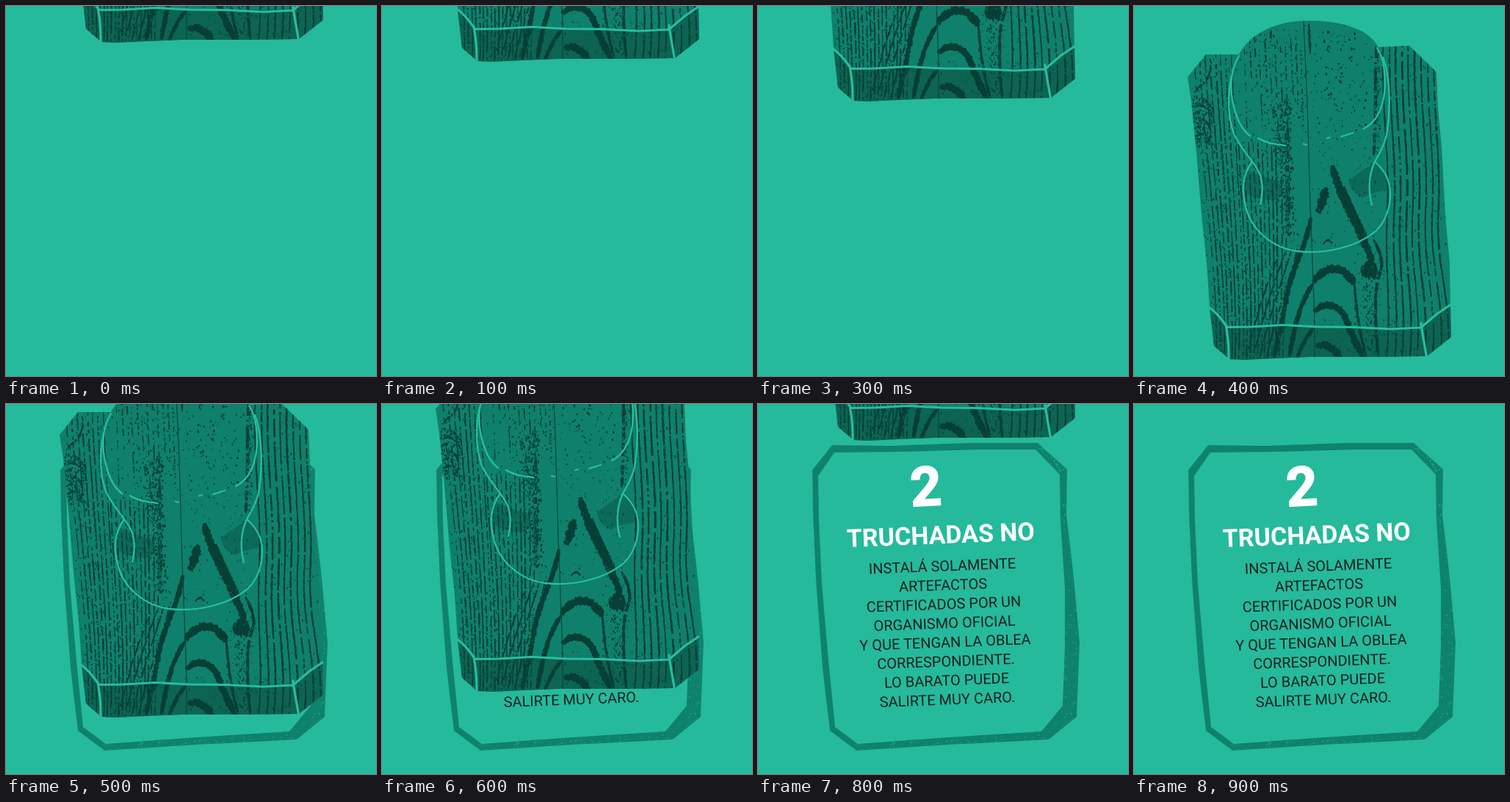
Write an HTML page that moves like this. It is 504 by 504 pixels and loops after 7900 ms.

```html
<!DOCTYPE html>
<html lang="es">
<head>
<meta charset="utf-8">
<title>Truchadas no</title>
<style>
  html, body { margin: 0; width: 100%; height: 100%; overflow: hidden; background: #25ba9b; }
  svg { display: block; width: 100%; height: 100%; }
  text { font-family: Roboto, sans-serif; text-anchor: middle; }
  .title { font-size: 34px; font-weight: 700; fill: #fff; }
  .digit { font-size: 75px; font-weight: 700; fill: #fff; stroke: #fff; stroke-width: 1.5; }
  .body { font-size: 20px; fill: #14211f; }
  .line { fill: none; stroke: #28bd9f; stroke-width: 2.3; stroke-linecap: round; stroke-linejoin: round; }
  #block { animation: drop 7900ms step-end infinite; }
  #card { animation: reveal 7900ms step-end infinite; }
  @keyframes drop {
    0%       { transform: translateY(-432px); }
    1.2658%  { transform: translateY(-406px); }
    2.5316%  { transform: translateY(-379px); }
    3.7974%  { transform: translateY(-352px); }
    5.0632%  { transform: translateY(0); }
    6.3291%  { transform: translateY(-55px); }
    7.5949%  { transform: translateY(-90px); }
    8.8607%  { transform: translateY(-125px); }
    10.1265% { transform: translateY(-432px); }
    11.3924%, 100% { transform: translateY(-520px); }
  }
  @keyframes reveal {
    0% { visibility: hidden; }
    6.3291%, 100% { visibility: visible; }
  }
</style>
</head>
<body>
<svg viewBox="0 0 504 504">
  <defs>
    <clipPath id="wood">
      <path id="shape" d="M98 66L143 66C160 35 196 20 237 20C283 20 319 31 333 56L375 54L412 90L414 140L419 190L424 285L430 350L431 407L432 451L399 477L330 478L240 478L190 480L150 482L130 481L109 463L103 411L99 350L92 285L85 200L78 130L73 97Z"/>
    </clipPath>
  </defs>

  <g id="card">
    <path fill="#0f826d" fill-rule="evenodd" d="M101 56L180 57L290 53L381 53L421 89L420 150L430 235L438 325L434 426L396 457L340 460L260 464L134 472L98 445L88 360L79 240L75 150L74 90Z
      M104 66L200 65L300 62L378 62L411 96L412 160L418 250L418 330L415 411L386 446L260 454L136 463L105 440L96 350L87 245L83 160L82 98Z"/>
    <path id="flecks" fill="#25ba9b"/>
    <text class="digit" x="230" y="138.500" transform="rotate(-3 230 138)">2</text>
    <g id="copy" transform="rotate(-2.2 254.500 312)">
      <text class="title" x="254" y="190">TRUCHADAS NO</text>
    </g>
  </g>

  <g id="block">
    <use href="#shape" fill="#0f806b"/>
    <g clip-path="url(#wood)">
      <path fill="#0d6453" d="M100 408L121 428L128 438L200 435L300 438L391 437L436 404V490H100Z"/>
      <path fill="#0c6a58" d="M153 222C167 232 190 234 201 244C203 252 199 262 193 265C178 265 160 261 150 253C147 242 149 231 153 222ZM328 213C312 224 297 231 293 240C295 250 303 258 312 261C322 255 335 252 349 251C347 235 338 222 328 213Z"/>
      <path id="grain" fill="#053f36"/>
      <path fill="none" stroke="#064a3f" stroke-width="1.300" d="M231 20L236 130L240 270L243.500 360L246 430V481"/>
    </g>
    <g class="line">
      <path d="M143 68C133 84 130 104 134 128C138 150 146 168 158 177M169 180C180 187 193 188 206 190M231 188L235 189M263 180L267 179M282 178L298 173M313 167C333 157 342 133 342 103C341 82 339 70 331 57"/>
      <path d="M133 95C127 123 127 148 136 174C144 192 158 206 168 222C177 238 176 254 172 270"/>
      <path d="M339 70C349 95 350 142 344 176C339 196 333 202 328 212C319 232 319 252 324 271"/>
      <path d="M160 213C148 231 147 249 151 269C158 304 187 329 222 334C258 338 302 330 330 306C348 288 353 258 346 237C342 226 336 219 328 212"/>
      <path stroke-width="3.200" d="M103 411C112 417 119 426 127 437.500L160 437L203 434.500L250 437L300 437.500L350 440L391 438L412 420L431 407M125 435C128 448 129 460 129 480M391 432C393 449 396 461 398 476"/>
    </g>
  </g>
</svg>
<script>
  const $ = id => document.getElementById(id);
  const NS = 'http://www.w3.org/2000/svg';
  let seed = 41;
  const rnd = () => {
    seed = (seed * 1664525 + 1013904223) % 4294967296;
    return seed / 4294967296;
  };
  const between = (a, b) => a + (b - a) * rnd();
  const f = n => n.toFixed(1);
  let grain = '';

  // Ragged brush stroke along a path, broken by random gaps.
  function streak(d, width, gap = 0) {
    const path = document.createElementNS(NS, 'path');
    path.setAttribute('d', d);
    const len = path.getTotalLength();
    let left = [], right = [];
    const flush = () => {
      if (left.length > 1) grain += 'M' + left.concat(right.reverse()).join('L') + 'Z';
      left = [];
      right = [];
    };
    for (let s = 0; s < len; s += 2.3) {
      const p = path.getPointAtLength(s), q = path.getPointAtLength(s + 1);
      const a = Math.atan2(q.y - p.y, q.x - p.x);
      const taper = Math.min(1, .5 + s / 20, .5 + (len - s) / 20);
      const edge = (list, side) => {
        const r = side * (width / 2 * taper * between(.7, 1.25) + between(-.2, .5));
        list.push(f(p.x - Math.sin(a) * r) + ' ' + f(p.y + Math.cos(a) * r));
      };
      edge(left, 1);
      edge(right, -1);
      if (rnd() < gap) {
        flush();
        s += between(-1, 4);
      }
    }
    flush();
  }

  const chip = (x, y, w, h) =>
    `M${f(x)} ${f(y)}l${f(w)} ${f(h * .3)}l${f(-w * .3)} ${f(h * .7)}l${f(-w * .8)} ${f(-h * .2)}z`;

  function specks(n, x, y, w, h, size = 1) {
    for (let i = 0; i < n; i++)
      grain += chip(x + w * rnd(), y + h * rnd(), size * between(.6, 2), size * between(.9, 3.6));
  }

  // Ragged column of clustered chips between two points.
  function mottle(n, x1, y1, x2, y2, spread, size) {
    for (let i = 0; i < n; i++) {
      const t = rnd(), off = (rnd() + rnd() - 1) * spread;
      specks(1, x1 + (x2 - x1) * t + off, y1 + (y2 - y1) * t, 1, 1, size);
    }
  }

  // Straight grain of the left board
  for (let x = 82; x < 208; x += between(6, 8)) {
    const end = 112 + (x - 82) * .72, top = x < 138 ? 66 : 185;
    const start = x + (end - x) * (top - 66) / 415;
    streak(`M${start} ${top}C${start + 3} ${top + 100} ${end + 5} 370 ${end} 482`, between(.9, 1.9), between(.1, .22));
  }
  // Straight grain of the right board
  for (let x = 339; x < 415; x += between(7.5, 9.5)) {
    const end = x + 5 + (x - 339) * .2;
    streak(`M${x} 52C${x - 2} 150 ${x + 10} 200 ${x + 6} 280S${end + 7} 400 ${end} 480`, between(1.6, 2.4), .05);
  }
  // Sparse marks in the dome
  for (let x = 150; x < 232; x += 7) {
    const y = between(32, 70);
    streak(`M${x} ${y}L${x + 4} ${y + between(70, 125)}`, between(.8, 1.7), .4);
  }
  streak('M187 28L186 50', 2.5, .2);
  streak('M238 24L240 66', 3, .15);
  streak('M330 55C328 100 331 150 326 205', 4, .07);
  mottle(90, 332, 62, 329, 205, 6, 1.2);

  // Rough column beside the seam
  mottle(190, 207, 125, 209, 310, 8, 1.5);
  mottle(70, 195, 130, 197, 215, 9, 1.4);
  mottle(60, 200, 225, 214, 320, 14, 1.3);
  streak('M208 125C212 170 207 225 211 300', 3, .2);

  // Arched figure and its legs
  streak('M241 288C236 325 218 350 208 395C203 425 196 450 191 480', 6.5);
  streak('M244 378C228 402 222 422 211 480', 6);
  streak('M246 438C235 449 228 463 222 480', 5);
  streak('M245 377C257 353 288 350 300 381', 11);
  streak('M300 376C302 400 305 440 317 480', 3.5, .04);
  streak('M246 417C255 401 280 405 288 425C295 444 304 462 312 480', 9);
  streak('M248 464C260 459 268 463 283 480', 10);
  streak('M258 324C262 317 268 317 270 325', 3.5);
  streak('M270 217C277 248 294 281 307 307C315 325 321 335 324 352', 10);
  streak('M286 246C294 270 306 292 318 316', 4);
  streak('M262 247C259 259 256 270 250 283', 12);
  streak('M309 363C317 360 326 359 333 357', 25);
  streak('M326 318C337 337 341 350 333 370C326 395 329 440 333 480', 4, .03);
  mottle(70, 316, 372, 321, 470, 9, 1.2);
  for (let i = 0; i < 4; i++)
    streak(`M${224 - i * 9} ${325 + i * 5}C${214 - i * 10} 370 ${196 - i * 9} 410 ${180 - i * 9} 481`, 1.8, .1);

  // Knot at the left edge
  for (let i = 0; i < 6; i++)
    streak(`M${77 + i} ${128 + i * 10}C${88 + i} ${122 + i * 10} 101 ${126 + i * 9} ${108 - i} ${142 + i * 10}`, 3.5, .22);
  specks(130, 79, 122, 28, 68, 1.3);
  streak('M82 118C92 102 104 108 105 75', 2.5, .2);

  specks(190, 140, 22, 200, 160, 1.1);
  specks(110, 175, 28, 58, 155);
  specks(50, 250, 30, 70, 130, 1.5);
  specks(75, 240, 185, 95, 145);
  specks(190, 85, 70, 55, 340);
  specks(260, 105, 190, 100, 285);
  specks(75, 300, 335, 40, 110);
  specks(130, 345, 60, 80, 410);
  specks(130, 108, 425, 315, 55);
  $('grain').setAttribute('d', grain);

  let flecks = '';
  const fleck = (x, y) => flecks += chip(x, y, between(.6, 1.8), between(.7, 2));
  for (let i = 0; i < 80; i++) fleck(between(415, 434), between(100, 430));
  for (let i = 0; i < 55; i++) {
    const x = between(120, 410);
    fleck(x, 468 - (x - 135) * .055 + between(-5, 4));
  }
  for (let i = 0; i < 25; i++) {
    const t = rnd();
    fleck(383 + t * 34 + between(-4, 4), 57 + t * 36);
  }
  $('flecks').setAttribute('d', flecks);

  ['INSTALÁ SOLAMENTE', 'ARTEFACTOS', 'CERTIFICADOS POR UN', 'ORGANISMO OFICIAL',
   'Y QUE TENGAN LA OBLEA', 'CORRESPONDIENTE.', 'LO BARATO PUEDE', 'SALIRTE MUY CARO.'
  ].forEach((line, i) => {
    const t = document.createElementNS(NS, 'text');
    t.setAttribute('class', 'body');
    t.setAttribute('x', 254.5);
    t.setAttribute('y', 227.5 + 26 * i);
    t.textContent = line;
    $('copy').append(t);
  });
</script>
</body>
</html>
```
